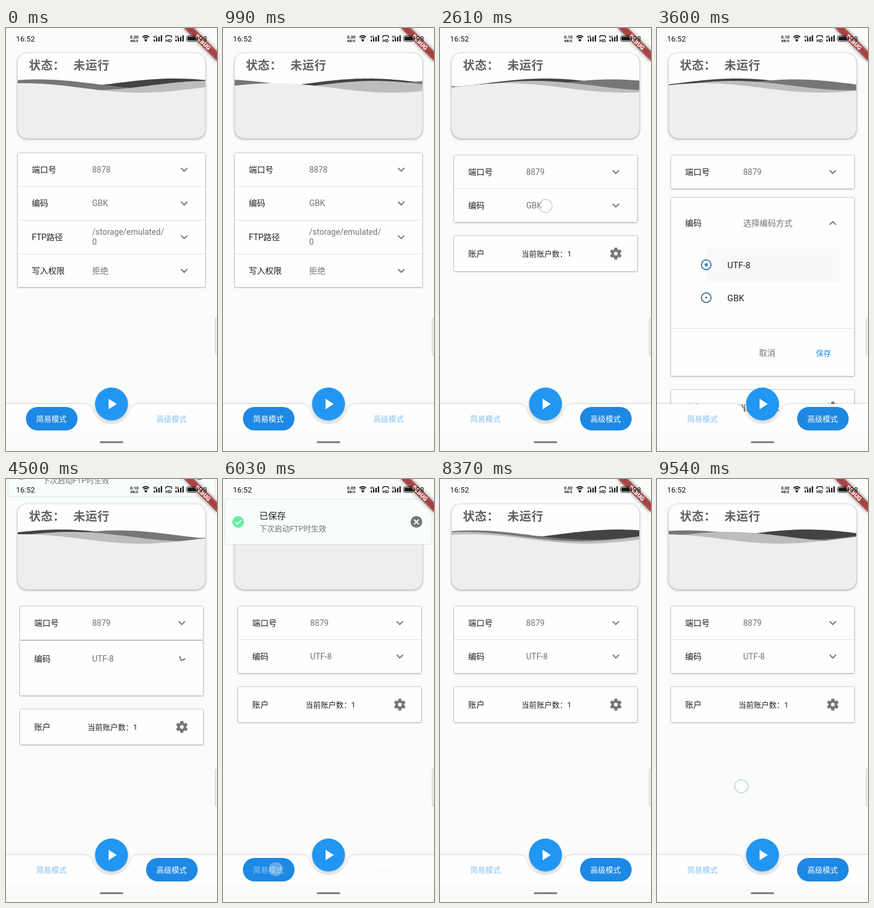
Write an HTML page that moves like this. It is 360x720 px and loops after 9.63 s.

```html
<!DOCTYPE html>
<html lang="zh-CN">
<head>
<meta charset="utf-8">
<title>FTP</title>
<style>
html, body { margin: 0; width: 100%; height: 100%; overflow: hidden; background: #fafcfa; }
svg { display: block; width: 100%; height: 100%; font-family: Roboto, "Noto Sans CJK SC", "Noto Sans CJK", sans-serif; }
.panel { filter: drop-shadow(0 0 .8px rgba(0,0,0,.45)) drop-shadow(0 1px 1px rgba(0,0,0,.18)); }
.card { filter: drop-shadow(.5px 1.5px 2px rgba(0,0,0,.38)); }
.bar { filter: drop-shadow(0 -.5px 1.5px rgba(0,0,0,.16)); }
.fab { filter: drop-shadow(0 2px 2px rgba(0,0,0,.25)); }
.toast { filter: drop-shadow(0 0 1px rgba(60,90,100,.35)); }
</style>
</head>
<body>
<svg id="stage" viewBox="0 0 360 720" xmlns="http://www.w3.org/2000/svg"></svg>
<script>
const LOOP = 9630, STEP = 90;
const INK = '#212121', GREY = '#757575', BLUE = '#1e88e5', PALE = '#85c4ee', PAPER = '#fefefe', RULE = '#e0e1e0';
const stage = document.getElementById('stage');

const set = (node, attrs) => {
  for (const k in attrs) node.setAttribute(k, attrs[k]);
  return node;
};
const add = (parent, tag, attrs) =>
  parent.appendChild(set(document.createElementNS('http://www.w3.org/2000/svg', tag), attrs || {}));
const group = (parent, attrs) => add(parent, 'g', attrs);
const rect = (parent, x, y, width, height, fill, rx = 0) => add(parent, 'rect', { x, y, width, height, fill, rx });
const circle = (parent, cx, cy, r, attrs) => add(parent, 'circle', { cx, cy, r, ...attrs });
const text = (parent, x, y, str, size, fill, attrs) => {
  const node = add(parent, 'text', { x, y, 'font-size': size, fill, ...attrs });
  node.textContent = str;
  return node;
};
const stroke = (parent, d, color, width) =>
  add(parent, 'path', { d, fill: 'none', stroke: color, 'stroke-width': width });
const rule = (parent, x, y, w) => rect(parent, x, y, w, 1, RULE);
const clip = id => add(add(defs, 'clipPath', { id }), 'rect');
const move = (node, x, y) => node.setAttribute('transform', `translate(${x} ${y})`);

const clamp = v => Math.max(0, Math.min(1, v));
const ramp = (t, start, length) => clamp((t - start) / length);
const ease = u => u * u * (3 - 2 * u);
const mix = (a, b, u) => a + (b - a) * u;
const blend = (a, b, u) => 'rgb(' + [1, 3, 5].map(i =>
  Math.round(mix(parseInt(a.substr(i, 2), 16), parseInt(b.substr(i, 2), 16), u))) + ')';

// Smooth curve through [time, value] points
function track(keys, t) {
  const last = keys.length - 1;
  const slope = j => {
    const a = keys[Math.max(0, j - 1)], b = keys[Math.min(last, j + 1)];
    return (b[1] - a[1]) / (b[0] - a[0]);
  };
  let i = 0;
  while (i < last - 1 && t > keys[i + 1][0]) i++;
  const [t0, a] = keys[i], [t1, b] = keys[i + 1];
  const d = t1 - t0, u = (t - t0) / d, v = 1 - u;
  return a * (1 + 2 * u) * v * v + slope(i) * d * u * v * v +
    b * u * u * (3 - 2 * u) - slope(i + 1) * d * u * u * v;
}

const defs = add(stage, 'defs');
rect(stage, 0, 0, 360, 720, '#fafcfa');

// Status card with waves; keys hold the crest position of each wave
rect(stage, 20, 43, 320, 145, PAPER, 16).setAttribute('class', 'card');
set(clip('cardClip'), { x: 20, y: 43, width: 320, height: 145, rx: 16 });
const waveBox = group(stage, { 'clip-path': 'url(#cardClip)' });
const waves = [
  { fill: '#424442', mid: 94, keys: [[0, 287], [1710, 218], [3600, 136], [7020, -30], [8370, -96], [9540, -145]] },
  { fill: '#757775', mid: 95.5, keys: [[0, 55], [1710, -50], [3600, -165], [7020, -318], [8370, -345], [9540, -350]] },
  { fill: '#bcbdbc', mid: 98, keys: [[0, 345], [1710, 205], [3600, 130], [7020, 72], [8370, 40], [9540, 120]] },
  { fill: '#edeeed', mid: 102, keys: [[0, 430], [1710, 515], [3600, 480], [7020, 240], [8370, 50], [9540, 10]] }
];
for (const w of waves) w.node = add(waveBox, 'path', { fill: w.fill });
function drawWave(w, t) {
  const crest = track(w.keys, t);
  let d = 'M20 190';
  for (let x = 20; x <= 340; x += 4)
    d += `L${x} ${(w.mid - 8 * Math.cos((x - crest) * Math.PI / 200)).toFixed(2)}`;
  w.node.setAttribute('d', d + 'L340 190Z');
}
const bold = { 'font-weight': 700, 'letter-spacing': .5 };
text(stage, 39, 71, '状态：', 20, '#616161', bold);
text(stage, 115, 71, '未运行', 20, '#616161', bold);

function chevron(parent, x, y) {
  const g = group(parent);
  move(g, x, y);
  return stroke(g, 'M-5.3 -2.7L0 2.6L5.3 -2.7', GREY, 2);
}

// Simple page
const simple = group(stage);
rect(simple, 20, 213, 320, 228, PAPER, 1).setAttribute('class', 'panel');
[['端口号', '8878'], ['编码', 'GBK'], ['FTP路径', ''], ['写入权限', '拒绝']].forEach(([label, value], i) => {
  const y = 241 + i * 57.4;
  text(simple, 44, y + 5, label, 14, INK);
  text(simple, 147, y + 5, value, 14, GREY);
  chevron(simple, 304, y);
  if (i) rule(simple, 20, y - 29, 320);
});
text(simple, 147, 352, '/storage/emulated/', 14, GREY);
text(simple, 147, 369, '0', 14, GREY);

// Advanced page
const advanced = group(stage);
const panels = group(advanced, { class: 'panel' });
rect(panels, 24, 217, 312.5, 56.5, PAPER, 1);
const codeRect = rect(panels, 24, 273, 312.5, 57.5, PAPER, 1);
text(advanced, 48, 250, '端口号', 14, INK);
text(advanced, 147, 249.5, '8879', 14, GREY);
chevron(advanced, 300, 245);
const seam = rule(advanced, 24, 273, 312);

const codeHead = group(advanced);
text(codeHead, 48, 307, '编码', 14, INK);
const codeValue = text(codeHead, 147, 307, '', 14, GREY);
const codeArrow = chevron(codeHead, 300, 302);

const codeClip = clip('codeClip');
const codeBody = group(group(advanced, { 'clip-path': 'url(#codeClip)' }));
const optionGlow = rect(codeBody, 82, 375, 230, 56, '#f8f8f8');
const radios = ['UTF-8', 'GBK'].map((name, i) => {
  const y = 403 + i * 56;
  text(codeBody, 120, y + 5.5, name, 15, INK);
  return {
    ring: circle(codeBody, 84, y, 8.2, { fill: 'none', 'stroke-width': 2 }),
    dot: circle(codeBody, 84, y, 0)
  };
});
rule(codeBody, 24, 511, 312);
text(codeBody, 174, 558, '取消', 14, GREY);
text(codeBody, 271, 557.5, '保存', 13, BLUE, { 'font-weight': 500 });

const account = group(advanced);
rect(account, 24, 354, 312.5, 60, PAPER, 1).setAttribute('class', 'panel');
text(account, 48, 389, '账户', 14, INK, { 'font-weight': 500 });
text(account, 139, 389, '当前账户数：1', 13, INK);
let gear = '';
for (let i = 0; i < 6; i++) {
  const a = i * Math.PI / 3 - Math.PI / 2;
  [[-.36, 7.2], [-.23, 10], [.23, 10], [.36, 7.2]].forEach(([da, r]) => {
    gear += `${gear ? 'L' : 'M'}${(300 + r * Math.cos(a + da)).toFixed(2)} ${(384 + r * Math.sin(a + da)).toFixed(2)}`;
  });
}
add(account, 'path', {
  d: gear + 'ZM303.5 384a3.5 3.5 0 1 0 -7 0a3.5 3.5 0 1 0 7 0Z',
  fill: GREY, 'fill-rule': 'evenodd', stroke: GREY, 'stroke-width': .6, 'stroke-linejoin': 'round'
});

// Side handle and bottom bar
set(rect(stage, 357, 493, 8, 64, '#eeefee', 3), { stroke: '#c9cac9' });
add(stage, 'path', {
  class: 'bar', fill: PAPER,
  d: 'M-5 640H130Q145 640 146.97 648.06A34 34 0 0 0 213.03 648.06Q215 640 230 640H365V690H-5Z'
});
rect(stage, 0, 690, 360, 30, '#fafcfa');
rect(stage, 160, 703.5, 40, 3, '#777977', 1.5);

const tabs = [['简易模式', 34], ['高级模式', 239]].map(([name, x]) => ({
  glow: rect(stage, x, 645, 88, 40, '#dcecf8', 20),
  pill: rect(stage, x, 645, 88, 40, BLUE, 20),
  label: text(stage, x + 43.5, 670, name, 13, PALE, { 'text-anchor': 'middle' })
}));
circle(stage, 180, 640, 28, { fill: '#2196f3', class: 'fab' });
add(stage, 'path', { d: 'M175 631V649L189 640Z', fill: '#fff' });

// Toast
const toast = group(stage);
set(rect(toast, 4, 35, 352, 76, '#f9fcfc', 4), { class: 'toast' });
circle(toast, 26, 73, 10, { fill: '#66eda5' });
stroke(toast, 'M21 73.3L24.6 76.8L31.3 69.8', '#fff', 1.9);
text(toast, 62, 68, '已保存', 15, INK);
text(toast, 62, 88.5, '下次启动FTP时生效', 13, GREY);
circle(toast, 330, 73, 10, { fill: GREY });
stroke(toast, 'M326 69L334 77M334 69L326 77', '#fff', 2);

// Corner banner
const banner = group(stage, { transform: 'translate(360 0) rotate(45)' });
const blur = add(defs, 'filter', { id: 'soft', x: '-50%', y: '-150%', width: '200%', height: '400%' });
add(blur, 'feGaussianBlur', { stdDeviation: 3 });
set(rect(banner, -40, 28, 80, 12, '#000'), { opacity: .5, filter: 'url(#soft)' });
rect(banner, -40, 28, 80, 12, 'rgba(183,28,28,.63)');
text(banner, 0, 37.7, 'DEBUG', 10.2, '#fff', { 'font-weight': 900, 'text-anchor': 'middle' });

// Status bar
const BLACK = '#161716';
const tiny = (x, y, str, size) => text(stage, x, y, str, size, BLACK, { 'font-weight': 700, 'text-anchor': 'middle' });
text(stage, 17, 22.7, '16:52', 13, BLACK);
const speed = tiny(219, 17.5, '', 7.2);
tiny(219, 23.6, 'KB/S', 6);
[[7.6, 2], [4.6, 2]].forEach(([r, w]) => {
  const s = r * .74;
  stroke(stage, `M${238.5 - s} ${21 - s}A${r} ${r} 0 0 1 ${238.5 + s} ${21 - s}`, BLACK, w);
});
add(stage, 'path', { d: 'M238.5 23.5L235.8 20.2Q238.5 18 241.2 20.2Z', fill: BLACK });
[['4G', 251], ['3G', 288]].forEach(([name, x]) => {
  tiny(x + 3.5, 16.5, name, 5.5);
  for (let i = 0; i < 4; i++) rect(stage, x + 1 + i * 4, 19.5 - i * 2.4, 2.3, 3.5 + i * 2.4, BLACK, .6);
});
tiny(277.5, 23.5, 'HD', 8);
stroke(stage, 'M272.5 17V15.5Q272.5 13 275 13H280Q282.5 13 282.5 15.5V17', BLACK, 1.3);
set(rect(stage, 308, 13.2, 17.5, 9.6, 'none', 3.4), { stroke: BLACK });
rect(stage, 309.5, 14.7, 14.5, 6.6, BLACK, 2);
rect(stage, 326.5, 16, 1.5, 4, BLACK, .7);
text(stage, 329, 22.5, '98', 12.5, BLACK);

// Touch marker: from, to, x, y
const touches = [
  [1300, 1440, 283, 664], [2560, 2700, 180, 303], [3370, 3520, 130, 403], [4150, 4310, 284, 553],
  [5840, 6120, 90, 664], [6930, 7110, 265, 656], [9440, 9630, 144, 523]
];
const finger = circle(stage, 0, 0, 11.3, {
  fill: 'rgba(255,255,255,.3)', stroke: 'rgba(150,180,195,.55)', 'stroke-width': 1.5
});

const slide = t => ease(ramp(t, 1503, 500)) - ease(ramp(t, 6010, 500)) + ease(ramp(t, 7120, 500));
const chosen = (t, lag, length) =>
  ramp(t, 1370 + lag, length) - ramp(t, 5900 + lag, length) + ramp(t, 7040 + lag, length);

function drawCode(t) {
  const open = ease(ramp(t, 2700, 250)) - ease(ramp(t, 4310, 250));
  const top = mix(273, 289, open), height = mix(330.5, 592.5, open) - top;
  const box = { x: 24, y: top, width: 312.5, height };
  set(codeRect, box);
  set(codeClip, box);
  seam.setAttribute('opacity', 1 - open);
  move(codeHead, 0, 30 * open);
  move(account, 0, 262 * open);
  codeArrow.setAttribute('transform', `rotate(${180 * open})`);
  codeBody.setAttribute('opacity', open);
  codeValue.textContent = t >= 2700 && t < 4310 ? '选择编码方式' : t < 4310 ? 'GBK' : 'UTF-8';
  optionGlow.setAttribute('opacity', ramp(t, 3420, 90) - ramp(t, 3640, 200));
  const pick = ramp(t, 3490, 180);
  radios.forEach(({ ring, dot }, i) => {
    const on = i ? 1 - pick : pick, color = blend(GREY, BLUE, on);
    ring.setAttribute('stroke', color);
    set(dot, { r: 4.6 * on, fill: color });
  });
}

function drawTabs(t) {
  const bg = chosen(t, 0, 120), ink = chosen(t, 100, 300);
  tabs.forEach(({ glow, pill, label }, i) => {
    pill.setAttribute('opacity', i ? bg : 1 - bg);
    label.setAttribute('fill', blend(PALE, '#ffffff', i ? ink : 1 - ink));
    const taps = i ? [1300, 6930] : [5840];
    glow.setAttribute('opacity', taps.some(s => t >= s && t < s + 200) ? 1 : 0);
  });
}

function draw(t) {
  waves.forEach(w => drawWave(w, t));
  const page = slide(t);
  move(simple, -360 * page, 0);
  move(advanced, 360 * (1 - page), 0);
  drawCode(t);
  drawTabs(t);
  move(toast, 0, -115 * (1 - ease(ramp(t, 4400, 280)) + ease(ramp(t, 6300, 360))));
  speed.textContent = t < 1080 ? '0.20' : t < 4950 ? '0.10' : t < 6300 ? '0.05' : '0.02';
  const touch = touches.find(([from, to]) => t >= from && t < to);
  finger.setAttribute('opacity', touch ? 1 : 0);
  if (touch) set(finger, { cx: touch[2], cy: touch[3] });
}

const begin = performance.now();
function tick() {
  const t = (performance.now() - begin) % LOOP;
  draw(Math.floor(t / STEP) * STEP);
  requestAnimationFrame(tick);
}
tick();
</script>
</body>
</html>
```
